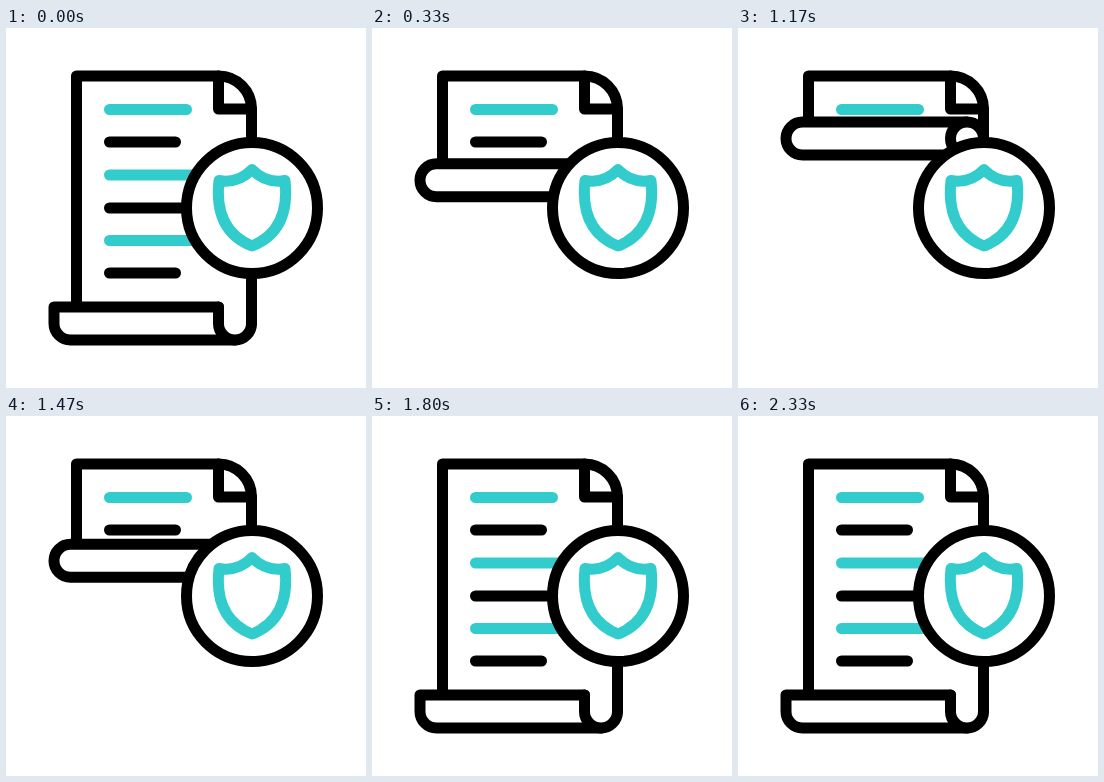
Recreate the animation shown at these times as an HTML page. Size 360 by 360 pixels, loop 3000 ms.

```html
<!DOCTYPE html>
<html lang="en">
<head>
<meta charset="utf-8">
<title>Protected document</title>
<style>
  html, body { margin: 0; width: 100%; height: 100%; overflow: hidden; background: #fff; }
  svg { display: block; width: 100vw; height: 100vh; }
  path, circle { fill: none; stroke: #000; stroke-width: 11; stroke-linecap: round; stroke-linejoin: round; }
  .teal { stroke: #33cccc; }
  .paper { fill: #fff; }
</style>
</head>
<body>
<svg viewBox="0 0 360 360">
  <clipPath id="visible"><rect id="unrolled" width="360"/></clipPath>
  <g clip-path="url(#visible)">
    <path class="teal" d="M103.5 81.5H180.5M103.5 147H190M103.5 212.5H190"/>
    <path d="M103.5 114H169.5M103.5 180H190M103.5 245H169.5"/>
  </g>
  <path id="page"/>
  <path d="M212.5 48V81H245.5"/>
  <path id="roll" class="paper"/>
  <path id="curl" class="paper"/>
  <circle class="paper" cx="246" cy="180" r="65.5"/>
  <path class="teal" d="M246 141.5Q232 156 213 152.5C210 180 216 206 246 218C276 206 282 180 279 152.5Q260 156 246 141.5Z"/>
</svg>
<script>
  const LOOP = 3000, OPEN_Y = 279, ROLLED_Y = 94, R = 16.5;
  const [unrolled, page, roll, curl] =
    ['unrolled', 'page', 'roll', 'curl'].map(id => document.getElementById(id));

  const phase = (t, from, to) => Math.min(1, Math.max(0, (t - from) / (to - from)));

  // 0 = sheet fully open, 1 = fully rolled up
  function rolledAmount(t) {
    return t < 1000
      ? 1 - (1 - phase(t, 55, 670)) ** 2.5
      : 1 - phase(t, 1155, 1775) ** 2.5;
  }

  function draw(t) {
    const amount = rolledAmount(t);
    const y = OPEN_Y + (ROLLED_Y - OPEN_Y) * amount;
    const mid = y + R, bottom = y + 2 * R;
    const corner = R * Math.min(1, amount / 0.6);
    // the right end changes shape while it is behind the badge
    const closed = amount > 0.5;

    unrolled.setAttribute('height', y);
    page.setAttribute('d', `M70.5 ${y}V48H212.5A33 33 0 0 1 245.5 81V${mid}`);
    roll.setAttribute('d',
      `M${closed ? 229 : 212.5} ${y}H${48 + corner}` +
      `A${corner} ${corner} 0 0 0 48 ${y + corner}V${mid}` +
      `A${R} ${R} 0 0 0 64.5 ${bottom}H229`);
    curl.setAttribute('d', closed
      ? `M212.5 ${mid}a${R} ${R} 0 0 1 33 0a${R} ${R} 0 0 1 -33 0Z`
      : `M212.5 ${y}V${mid}A${R} ${R} 0 0 0 245.5 ${mid}V${y}`);
  }

  const start = performance.now();
  function tick() {
    draw((performance.now() - start) % LOOP);
    requestAnimationFrame(tick);
  }
  tick();
</script>
</body>
</html>
```
